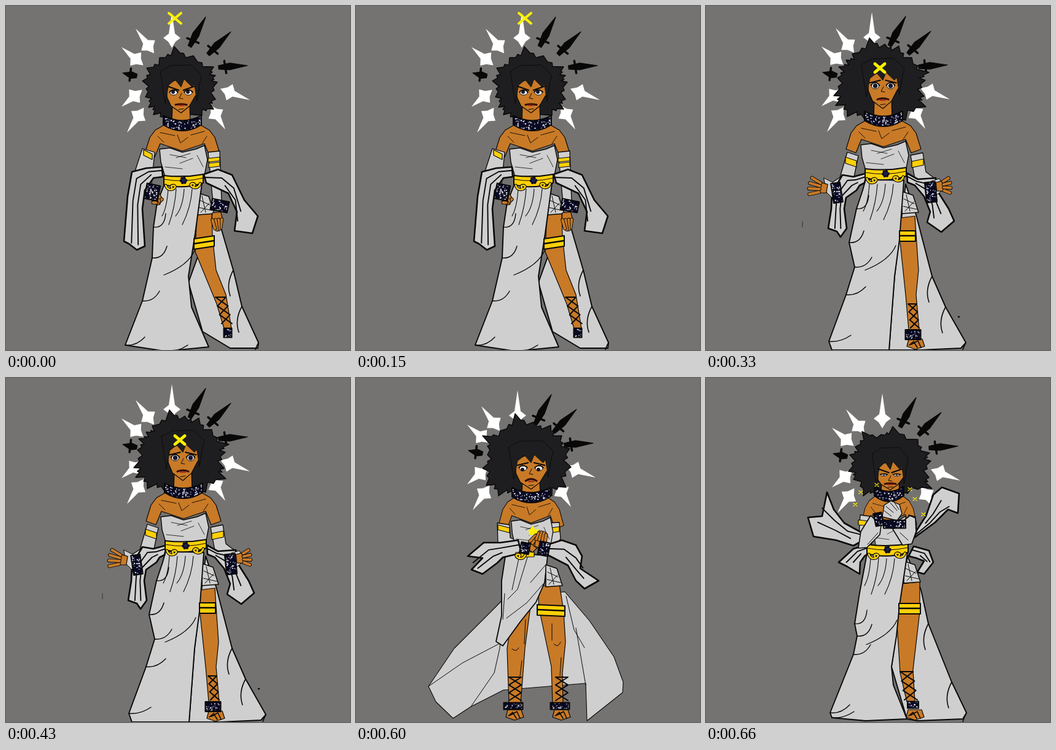
An HTML page with a canvas that plays this animation: 560x560 px, repeating every 0.75 s.

```html
<!DOCTYPE html>
<html lang="en">
<head>
<meta charset="utf-8">
<title>Star dancer</title>
<style>
html, body { margin: 0; width: 100%; height: 100%; overflow: hidden; background: #747371; }
canvas { display: block; }
</style>
</head>
<body>
<canvas id="stage" width="560" height="560"></canvas>
<script>
const ctx = document.getElementById('stage').getContext('2d');
const GOLD = '#ffd008', SKIN = '#c87a27', CLOTH = '#cfcfcf', NAVY = '#090922', HAIR = '#1e1e20', INK = '#080808', LIGHT = '#fff000';

const pairs = text => text.match(/\S+ \S+/g).map(p => p.split(' ').map(Number));
const mix = (a, b, k) => [a[0] + (b[0] - a[0]) * k, a[1] + (b[1] - a[1]) * k];

function ink(d, width = 1, color = INK) {
  ctx.lineWidth = width;
  ctx.strokeStyle = color;
  ctx.stroke(new Path2D(d));
}
function shape(points, color, width = 1.2) {
  const d = 'M' + (Array.isArray(points) ? points.join('L') : points) + 'Z';
  ctx.fillStyle = color;
  ctx.fill(new Path2D(d));
  if (width) ink(d, width);
}
function dot(x, y, rx, ry, color, width = 0) {
  ctx.beginPath();
  ctx.ellipse(x, y, rx, ry, 0, 0, 7);
  ctx.fillStyle = color;
  ctx.fill();
  ctx.lineWidth = width;
  ctx.strokeStyle = INK;
  if (width) ctx.stroke();
}
// Runs a drawing in its own moved, turned and scaled space.
function at(x, y, turn, draw, sx = 1) {
  ctx.save();
  ctx.translate(x, y);
  ctx.rotate(turn);
  ctx.scale(sx, 1);
  draw();
  ctx.restore();
}
function cross(x, y, r, width = 4) {
  const s = r * .85;
  ink(`M${x - r} ${y - s}L${x + r} ${y + s}M${x + r} ${y - s}L${x - r} ${y + s}`, width, LIGHT);
}

// Each ray runs from its hub to its tip.
const stars = pairs('270 52 270 10 232 64 211 36 212 86 188 66 210 145 188 163 216 177 197 205 341 174 357 200 363 139 397 152');
const swords = pairs('299 65 325 17 329 78 366 41 346 99 393 96 213 113 190 108');
function rays(list, draw) {
  for (let i = 0; i < list.length; i += 2) {
    const [[x, y], [u, v]] = [list[i], list[i + 1]];
    at(x, y, Math.atan2(v - y, u - x), () => draw(Math.hypot(u - x, v - y)));
  }
}
function halo(dx, dy) {
  at(dx, dy, 0, () => {
    rays(stars, n => shape(`${n} 0L8 -5 1 -14 -5 -6 -15 0 -5 6 1 14 8 5`, '#fff', 0));
    rays(swords, n => {
      shape(`0 -3L${n * .4} -6 ${n} 0 ${n * .4} 5 0 3`, INK);
      ink('M10 -10L12 10', 3.5);
    });
  });
}

// Curved band of dark beads with scattered glints.
function beads(x, y, w, h, turn = 0, sag = 0) {
  let seed = x * 31 + y * 7;
  const rnd = () => (seed = seed * 16807 % 2147483647) / 2147483647;
  const d = `M${-w / 2} ${-h / 2}Q0 ${sag - h / 2} ${w / 2} ${-h / 2}V${h / 2}Q0 ${h / 2 + sag * 1.2} ${-w / 2} ${h / 2}Z`;
  at(x, y, turn, () => {
    ctx.fillStyle = NAVY;
    ctx.fill(new Path2D(d));
    ctx.save();
    ctx.clip(new Path2D(d));
    ctx.fillStyle = '#e6e6f2';
    for (let i = w * (h + sag) / 15; i > 0; i--) {
      ctx.fillRect((rnd() - .5) * w, rnd() * (h + sag) - h / 2, .7 + rnd() * 1.9, .7 + rnd() * 1.6);
    }
    ctx.restore();
    ink(d, 2);
  });
}
function band(x, y, u, v, h, color = GOLD, width = 1.2) {
  shape(`${x} ${y}L${u} ${v} ${u} ${v + h} ${x} ${y + h}`, color, width);
}
function garter(x, y, u, v) {
  band(x, y, u, v, 17, GOLD, 2);
  ink(`M${x} ${y + 8}L${u} ${v + 8}`, 2.4);
}
function curl(x, y, side) {
  at(x, y, 0, () => {
    const d = 'M-8 -5Q-5 4 4 1Q10 -3 5 -5Q-1 -5 2 -1';
    ink(d, 5);
    ink(d, 2.6, GOLD);
  }, side);
}
function belt(x, y, u, v) {
  const c = (x + u) / 2, m = (y + v) / 2;
  const edge = k => `Q${c} ${m + 5 + k} `;
  shape(`${x} ${y}${edge(0)}${u} ${v}V${v + 14}${edge(19)}${x} ${y + 15}`, GOLD, 2);
  ink(`M${x} ${y + 6}${edge(8)}${u} ${v + 6}`);
  for (let a = 0; a < 6; a++) dot(c + 4 * Math.cos(a), m + 9 + 4 * Math.sin(a), 2.4, 2.4, NAVY);
  dot(c, m + 9, 3, 3, '#202048');
  curl(x + 11, y + 21, 1);
  curl(u - 13, v + 20, -1);
}
function laces(x, y, w, h, lean = 0) {
  let d = `M${x} ${y}h${w}`;
  for (let i = 0; i < 3; i++, x += lean / 3, y += h / 3) {
    d += `M${x} ${y}l${w + lean / 3} ${h / 3}M${x + w} ${y}l${lean / 3 - w} ${h / 3}`;
  }
  ink(d, 2);
}
function foot(x, y) {
  at(x, y, 0, () => {
    shape('-11 0L11 0 15 12 0 17 -14 12', SKIN);
    ink('M-7 9L4 3 9 14M-3 4L3 14M-10 10L-4 5', 1.6);
  });
}
function hand(x, y, turn, spread, length = 27) {
  at(x, y, turn, () => {
    shape('-2 -7L12 -9 15 0 12 9 -2 7', SKIN);
    for (let i = -1.5; i < 2; i++) {
      const d = `M10 ${i * 5}L${length - Math.abs(i) * 2} ${i * spread}`;
      ink(d, 6);
      ink(d, 4.2, SKIN);
    }
  });
}

// Spiky mass: a notch is pulled towards the middle between every two tips.
function mane(text) {
  const tips = pairs(text), n = tips.length;
  const middle = tips.reduce((s, p) => [s[0] + p[0] / n, s[1] + p[1] / n], [0, 0]);
  const outline = tips.flatMap((p, i) => {
    const q = tips[(i + 1) % n];
    return [p, mix(mix(p, q, .3), middle, .1), mix(mix(p, q, .5), middle, .06), mix(mix(p, q, .65), middle, .15)];
  });
  shape(outline, HAIR, 1.4);
}
function face({ x, y, w, h, eyes: [rx, ry, dx, dy], brow, mouth, neck }) {
  const local = text => pairs(text).map(([a, b]) => [a * w, b]);
  at(x, y, 0, () => {
    shape(`-14 ${h - 14}L14 ${h - 14} 15 ${neck - y} -15 ${neck - y}`, SKIN);
    shape(`${-w} -14L${-w * .95} 8 ${-w * .68} ${h * .66} 0 ${h} ${w * .55} ${h * .68} ${w * .95} 6 ${w * 1.2} -3 ${w * 1.2} -14 0 -24`, SKIN);
    shape(local('-1.4 -34 -1.08 18 -.85 -12 -.4 -21 0 -9 .2 -22 .75 -9 .9 -14 1.08 14 1.25 -14 1.4 -28 .7 -45 -.7 -44'), HAIR, .8);
    for (const side of [-1, 1]) {
      const ex = side * w * .5;
      dot(ex, 0, rx, ry, '#fff', 1);
      dot(ex + dx, dy, ry * .75, ry * .75, '#17172c');
      ink(`M${ex - rx - 1} -1Q${ex} ${-ry * 2} ${ex + rx + 1} -1`, 1.7);
      ink(`M${ex - side * 8} ${-7 - brow}L${ex + side * 9} ${-7 + brow}`, 2.3);
    }
    ink(`M1 1L-3 9 3 10M-4 ${h * .83}L4 ${h * .8}`);
    const m = h * .6;
    ink(`M-9 ${m}Q0 ${m - mouth} 9 ${m}`, 3, '#32100b');
    ink(`M-4 ${m + 1}h8`, 2, '#a4231a');
  });
}
function chest(x, y, size) {
  const half = pairs('-30 4 -44 12 -53 24 -61 50 -45 56 -36 34 0 46');
  const mirrored = half.map(([a, b]) => [-a, b]).reverse();
  at(x, y, 0, () => {
    shape([...half, ...mirrored], SKIN);
    ink('M-36 16L-12 21M36 14L14 20M-8 20L-3 33 9 24M-40 22L-30 32M40 22L32 34', .9);
  }, size);
}
function bodice(x, y, size) {
  at(x, y, 0, () => {
    shape('-37 43L-20 41 0 48 22 43 36 37 41 60 36 86 -28 88 -35 64', CLOTH, 1.4);
    ink('M-20 52L6 57M-10 57L13 50M-4 66L17 58M-28 72L0 75M24 53L34 72', .8);
  }, size);
}

const cloth = (text, width = 1.8) => shape(pairs(text), CLOTH, width);
const skin = text => shape(pairs(text), SKIN);

// The outline pairs up end to end, so the fold follows the strip.
function shawl(text) {
  const p = pairs(text), n = p.length;
  shape(p, CLOTH, 2.6);
  for (const k of [.36, .68]) {
    const line = p.slice(0, n / 2 - 1).map((q, i) => mix(q, p[n - 1 - i], k));
    ink('M' + line.slice(k < .5 ? 0 : 1).join('L'), 1.9);
  }
}
// The last vertices climb the left edge; each one starts a crease.
function skirt(text) {
  const p = pairs(text);
  shape(p, CLOTH, 1.9);
  p.slice(-6, -1).forEach(([x, y], i) => ink(`M${x} ${y}q18 2 ${36 - i * 4} -${10 + i * 3}`, 1.4));
  const [x, y] = p[0];
  for (let i = 0; i < 4; i++) ink(`M${x + 6 + i * 13} ${y + 8}q-2 30 ${-10 - i * 2} ${44 + i % 2 * 14}`, 1.1);
  ink(`M${x + 49} ${y + 108}q-10 24 -50 40`, 1.3);
}
function panel(text) {
  const p = pairs(text);
  shape(p, CLOTH, 1.9);
  p.slice(2, 5).forEach(([x, y]) => ink(`M${x} ${y}q-12 22 -5 42`, 1.6));
}
function shorts(x, y) {
  at(x, y, 0, () => {
    shape('0 0L18 6 27 34 0 36', CLOTH, 1.5);
    ink('M3 12L20 20M2 24L24 29M7 5L13 32M5 32L19 17');
  });
}

function figure(p) {
  const [x, y, size] = p.collar;
  halo(...p.halo);
  mane(p.hair);
  p.back();
  chest(x, y, size);
  p.sleeves.forEach(s => cloth(s, 1.3));
  p.bands.forEach(b => band(...b));
  p.legs();
  bodice(x, y, size);
  p.shawls.forEach(shawl);
  if (p.belt) belt(...p.belt);
  face({ ...p.face, neck: y });
  beads(x, y - 4, p.collarWidth || 62, 15, 0, 16);
  p.front();
}

const standing = {
  halo: [0, 1], collar: [287, 190, 1],
  hair: '258 190 240 177 232 165 227 148 222 122 229 101 250 84 274 66 305 81 338 99 341 113 344 124 341 152 338 168 319 178',
  face: { x: 285, y: 141, w: 24, h: 33, eyes: [6, 4, -1, -1], brow: -3, mouth: 2 },
  back: () => panel('335 345 345 344 370 430 384 489 411 548 410 557 365 557 320 530 297 450'),
  sleeves: ['222 232 242 238 236 300 250 314 226 305 209 272', '329 238 348 236 351 318 337 320'],
  bands: [[224, 234, 238, 241, 9], [329, 248, 348, 246, 6], [330, 256, 348, 254, 7]],
  legs() {
    skin('311 332 335 335 336 375 342 430 358 470 367 525 358 535 343 485 308 400');
    shorts(312, 304);
    skirt('258 290 319 289 308 370 297 440 302 490 330 555 260 562 194 552 222 480 238 410 240 360 246 320');
    garter(306, 379, 339, 374);
    laces(341, 474, 17, 43, 10);
    beads(361, 532, 13, 15);
  },
  shawls: ['254 262 228 264 205 270 198 310 192 383 200 387 213 397 226 391 222 330 226 300 240 280 255 278',
    '322 274 345 266 368 275 388 316 410 342 401 370 372 366 376 335 362 305 326 288'],
  belt: [257, 276, 321, 274],
  front() {
    hand(243, 308, 1.2, 2, 15);
    hand(343, 338, 1.5, 3);
    beads(238, 303, 22, 25, .2);
    beads(348, 325, 28, 18, .2);
    cross(275, 20, 10);
  }
};

const glancing = {
  halo: [-14, 3], collar: [279, 181, 1], collarWidth: 54,
  hair: '250 175 232 176 218 163 206 150 204 127 206 101 217 87 249 69 278 76 322 88 334 113 339 129 336 140 331 165 310 178',
  face: { x: 277, y: 127, w: 24, h: 30, eyes: [6, 3, -1, 0], brow: -1, mouth: -2 },
  back: () => panel('306 300 336 330 360 420 388 500 409 548 405 556 350 560 318 553 292 450'),
  sleeves: ['220 231 238 235 236 310 213 310', '327 232 341 229 344 262 362 310 344 314'],
  bands: [[219, 240, 238, 241, 9], [328, 240, 344, 239, 10]],
  legs() {
    skin('305 338 336 336 340 375 355 465 357 517 345 517 331 455 306 380');
    shorts(308, 302);
    skirt('252 281 316 279 305 350 300 400 291 450 303 505 329 555 260 560 190 556 188 545 222 460 232 400 240 350 245 310');
    garter(306, 369, 341, 364);
    laces(331, 466, 24, 49, 7);
    foot(351, 537);
    beads(352, 527, 20, 19);
  },
  shawls: ['249 267 225 265 200 272 197 290 204 325 190 380 197 402 222 404 220 370 228 330 240 300 232 295 240 285 250 288',
    '318 268 352 259 382 275 378 290 386 330 394 365 374 371 370 345 378 325 358 290 345 278 325 284'],
  belt: [252, 266, 317, 263],
  front() {
    cloth('224 287 236 293 234 314 228 334 210 336 215 312', 1);
    cloth('336 283 350 287 370 317 372 334 354 337', 1);
    hand(215, 336, 1.75, 5);
    hand(364, 335, 1.4, 5, 24);
    beads(225, 317, 26, 12, .1);
    beads(356, 314, 28, 14, -.15);
    ink('M269 142h12', 3, '#f4eee7');
    cross(260, 42, 10);
    ink('M152 152h1M168 530h1');
  }
};

const offering = {
  halo: [0, 0], collar: [289, 183, 1],
  hair: '258 184 230 180 211 162 208 146 214 117 216 99 228 88 238 78 266 52 291 62 314 65 335 84 363 108 357 121 355 147 358 164 325 186',
  face: { x: 288, y: 130, w: 25, h: 37, eyes: [6, 5, 0, 0], brow: 2, mouth: 4 },
  back: () => panel('325 290 342 340 368 440 390 490 423 548 415 557 350 560 298 560 307 440'),
  sleeves: ['230 238 248 244 239 288 212 305 198 292 218 279', '333 243 353 239 358 270 378 285 366 297 340 281'],
  bands: [[227, 246, 245, 252, 10], [335, 253, 354, 249, 10]],
  legs() {
    skin('316 345 340 342 346 430 342 470 347 527 330 527 325 470 315 375');
    shorts(319, 302);
    skirt('260 282 322 284 315 380 307 440 298 560 205 560 200 546 228 470 242 425 233 385 245 330 255 300');
    garter(315, 366, 341, 366);
    laces(329, 485, 14, 39, 4);
    foot(341, 542);
    beads(337, 535, 25, 16);
  },
  shawls: ['262 272 240 278 222 275 205 305 204 330 199 362 213 367 219 376 229 362 225 330 228 312 245 300 250 292 258 288',
    '327 272 345 282 374 280 376 300 395 330 404 350 383 368 360 352 365 335 355 310 340 292 328 287'],
  belt: [259, 265, 326, 263],
  front() {
    cloth('192 280 206 287 214 300 205 312 196 303', 1);
    cloth('367 285 380 281 388 298 376 307', 1);
    hand(195, 297, 3.3, 9, 28);
    hand(377, 294, -.1, 8, 22);
    beads(213, 304, 15, 32, -.15);
    beads(366, 303, 17, 33, -.1);
    cross(283, 101, 8, 5);
    ink('M411 506h1', 2.5);
    ink('M157 351v9', .6);
  }
};

const cupping = {
  halo: [-7, 10], collar: [285, 190, .87],
  hair: '258 190 232 192 212 175 206 147 214 125 206 94 235 86 259 58 288 72 317 77 335 94 348 115 350 145 342 178 319 192',
  face: { x: 285, y: 147, w: 26, h: 34, eyes: [6, 4, -1, 2], brow: 2, mouth: 6 },
  back() {
    cloth('240 360 195 405 160 440 118 502 130 527 158 554 187 535 240 508 374 497 376 558 434 512 435 495 420 454 380 395 340 348', 1.1);
    ink('M236 431L173 464 118 502M238 390L234 440 225 480 187 535M342 355L355 410 372 439M374 500L358 407', 1);
  },
  sleeves: ['230 236 250 239 251 260 274 270 270 287 245 283 231 270', '313 236 331 235 333 262 318 280 306 285 306 271'],
  bands: [[231, 239, 250, 244, 8], [312, 245, 331, 242, 8]],
  legs() {
    skin('251 408 284 372 275 440 268 530 249 530 246 440');
    skin('296 340 331 335 338 380 341 430 336 480 337 530 320 530 318 470 298 375');
    ink('M276 393L274 433M254 441Q261 447 265 439M319 400L319 427M322 433Q329 440 333 430M270 460L267 485M334 455L332 485');
    cloth('244 284 312 289 307 333 293 365 268 396 239 436 228 429 237 387 237 330');
    ink('M265 294L254 345M279 292L263 344 247 360M308 305L284 333M305 335L278 366 245 391M242 351L239 393');
    shorts(309, 304);
    garter(295, 369, 340, 371);
    for (const x of [258, 334]) {
      laces(x - 9, 487, 20, 38);
      foot(x, 540);
      beads(x - 2, 534, 31, 11);
    }
  },
  shawls: ['264 264 235 268 208 268 182 290 206 293 188 312 206 319 230 301 239 292 269 285',
    '310 272 335 264 358 272 368 290 365 310 395 330 372 343 358 330 345 305 312 288'],
  front() {
    band(260, 284, 290, 283, 8);
    curl(268, 292, -1);
    shape('289 240L291 247 298 246 294 254 282 256 281 248', LIGHT, 0);
    hand(283, 278, -.9, 4, 26);
    hand(298, 274, -1.3, 4, 24);
    beads(275, 277, 15, 18, .2);
    beads(306, 278, 17, 22, .2);
  }
};

const praying = {
  halo: [17, 15], collar: [298, 188, .74], collarWidth: 48,
  hair: '275 190 256 192 240 165 232 152 234 125 243 112 254 87 285 92 304 79 345 100 364 122 366 135 363 162 368 180 328 188',
  face: { x: 300, y: 158, w: 21, h: 24, eyes: [5, 1.5, 0, 0], brow: -3, mouth: 2 },
  back: () => panel('328 290 350 345 362 400 400 495 424 545 418 555 345 558 327 555 302 470'),
  sleeves: ['251 223 266 225 277 251 268 274 248 277', '330 223 341 226 343 250 335 269 321 272'],
  bands: [[248, 231, 265, 233, 8], [330, 233, 341, 232, 8]],
  legs() {
    skin('318 335 348 332 348 380 337 475 340 527 327 527 316 480 310 385');
    shorts(322, 298);
    skirt('262 286 328 284 315 370 310 420 302 470 305 500 327 555 260 558 205 553 202 545 240 450 246 420 242 400 250 350');
    garter(314, 367, 349, 367);
    laces(316, 478, 21, 46, 7);
    foot(340, 540);
    beads(337, 532, 18, 11);
  },
  shawls: ['339 260 373 235 394 214 410 220 412 188 384 178 370 190 358 225 350 237 343 248',
    '252 251 225 236 208 214 197 186 189 225 166 227 175 258 212 264 240 273 258 263',
    '264 271 240 278 216 300 230 307 250 319 251 300 258 290 265 285',
    '338 274 363 281 370 300 355 319 344 316 355 298 342 293 330 290'],
  belt: [262, 271, 329, 270],
  front() {
    cloth('268 224 285 240 283 255 262 276 248 277 252 250', 1.6);
    cloth('332 224 341 228 342 250 335 270 320 272 304 246', 1.6);
    cloth('290 207 301 200 315 206 319 221 311 232 287 226', 1.3);
    ink('M293 209L305 219M300 203L311 216M307 203L314 214M290 216L302 225M280 252L263 271M316 252L329 264');
    beads(281, 230, 13, 21, -.2);
    beads(307, 238, 36, 13);
    pairs('278 174 243 206 332 181 354 222 340 197 252 186').forEach(([x, y]) => cross(x, y, 3, 1.2));
  }
};

const poses = [[250, standing], [330, glancing], [500, offering], [660, cupping], [750, praying]];
const start = performance.now();
function draw() {
  const t = (performance.now() - start) % 750;
  ctx.fillStyle = '#747371';
  ctx.fillRect(0, 0, 560, 560);
  ctx.lineCap = ctx.lineJoin = 'round';
  figure(poses.find(([end]) => t < end)[1]);
  requestAnimationFrame(draw);
}
draw();
</script>
</body>
</html>
```
